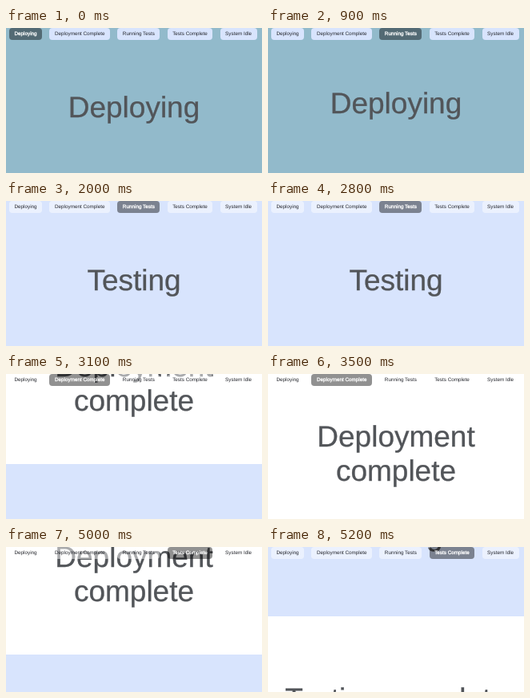
These frames come from a looping animation (320x182 px, 5300 ms). An HTML page:

```html
<!DOCTYPE html>
<html lang="en">
<head>
<meta charset="utf-8">
<title>Deployment status</title>
<style>
html, body { margin: 0; width: 100%; height: 100%; overflow: hidden; }
body {
  position: relative;
  background: #fff;
  font-family: "Liberation Sans", Arial, sans-serif;
  text-rendering: geometricPrecision;
}
#pages { position: absolute; top: -4px; left: 0; width: 320px; }
section {
  box-sizing: border-box;
  height: 205px;
  padding-top: 2px;
  display: flex;
  align-items: center;
  justify-content: center;
  text-align: center;
  font-size: 37px;
  line-height: 43px;
  color: #525559;
  -webkit-text-stroke: .3px #525559;
  white-space: pre;
}
nav { position: absolute; top: 0; left: 4px; display: flex; gap: 9.3px; }
nav span {
  padding: 0 6.5px;
  height: 14.5px;
  border-radius: 4px;
  font-size: 6.33px;
  line-height: 16px;
  white-space: nowrap;
  color: #24262c;
  background: rgba(255, 255, 255, .5);
}
nav.tinted span { background: #d8e4fd; }
nav .active, nav.tinted .active {
  color: #fff;
  background: rgba(0, 0, 0, .43);
  -webkit-text-stroke: .3px #fff;
}
</style>
</head>
<body>
<div id="pages"></div>
<nav></nav>
<script>
const LOOP = 5300, STEP = 100, PAGE = 205, GLIDE = 728, LAG = 100;
const pages = document.getElementById("pages");
const nav = document.querySelector("nav");

// button label, page title, page colour
const states = [
  ["Deploying", "Deploying", "#92bacb"],
  ["Deployment Complete", "Deployment\ncomplete", "#fff"],
  ["Running Tests", "Testing", "#d8e4fd"],
  ["Tests Complete", "Testing complete", "#fff"],
  ["System Idle", "Idle", "#d8e4fd"]
];

// start time, page to scroll to
const moves = [[796, 2], [2718, 1], [4750, 3]];

function add(parent, tag, text) {
  const el = parent.appendChild(document.createElement(tag));
  el.textContent = text;
  return el;
}

const buttons = states.map(([label, title, colour]) => {
  add(pages, "section", title).style.background = colour;
  return add(nav, "span", label);
});

// Cubic ease in and out
function ease(p) {
  p = Math.min(1, p);
  return p < .5 ? 4 * p ** 3 : 1 - 4 * (1 - p) ** 3;
}

function draw(now) {
  const t = Math.floor(now % LOOP / STEP) * STEP;
  let active = 0, scroll = 0;
  for (const [start, page] of moves) {
    // Nothing visibly moves until the button lights up
    if (t < start + LAG) break;
    active = page;
    scroll += (page - scroll) * ease((t - start) / GLIDE);
  }
  pages.style.transform = `translateY(${-Math.round(scroll * PAGE)}px)`;
  nav.classList.toggle("tinted", scroll < .95);
  buttons.forEach((b, i) => b.classList.toggle("active", i === active));
}

const begin = performance.now();
function tick() {
  draw(performance.now() - begin);
  requestAnimationFrame(tick);
}
tick();
</script>
</body>
</html>
```
